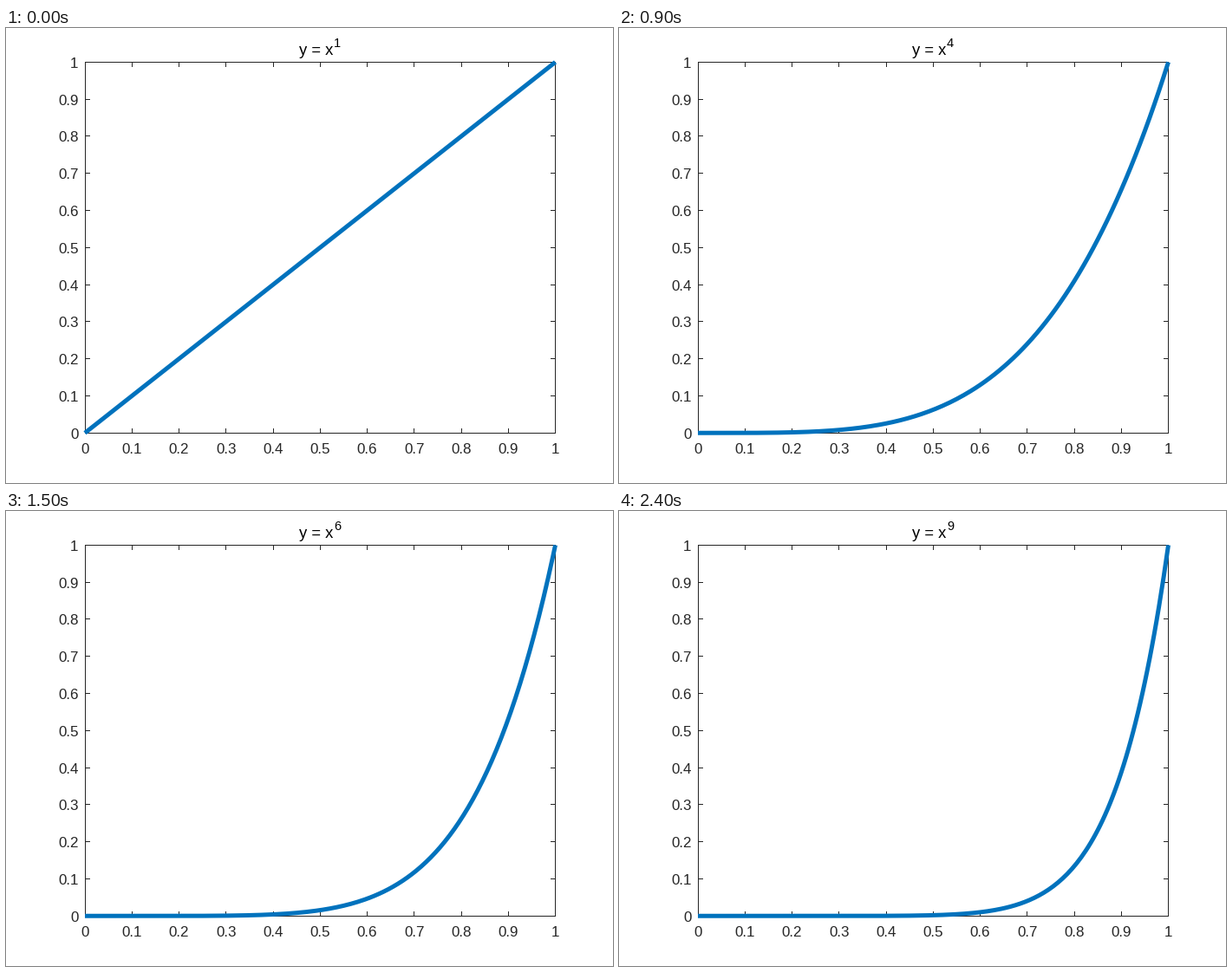
Recreate the animation shown at these times as a matplotlib script. Size 700 px wide and 525 px high, loop 2700 ms.

```python
import matplotlib.pyplot as plt
import numpy as np
from matplotlib.animation import FuncAnimation

WIDTH, HEIGHT, DPI = 700, 525, 100
PX = 72 / DPI  # points per pixel
LEFT, RIGHT = 0.13 * WIDTH, 0.905 * WIDTH
TOP, BOTTOM = 0.075 * HEIGHT, 0.89 * HEIGHT
TICK = 5
INK = "#262626"
BLUE = "#0072BD"
LABEL_SIZE = 17 * PX
TITLE_SIZE = 18.33 * PX

plt.rcParams["font.family"] = "Liberation Sans"

fig = plt.figure(figsize=(WIDTH / DPI, HEIGHT / DPI), dpi=DPI, facecolor="white")
stage = fig.add_axes([0, 0, 1, 1])
stage.set_xlim(0, WIDTH)
stage.set_ylim(HEIGHT, 0)
stage.axis("off")


def to_px(x, y):
    return LEFT + x * (RIGHT - LEFT), BOTTOM - y * (BOTTOM - TOP)


def pixel_center(value):
    return np.floor(value + 1e-6) + 0.5


def stroke(xs, ys):
    stage.plot(xs, ys, color=INK, lw=PX, snap=False,
               solid_capstyle="projecting", solid_joinstyle="miter")


def label(x, y, text, size=LABEL_SIZE, color=INK, ha="left"):
    return stage.text(x, y, text, fontsize=size, color=color, ha=ha, va="baseline")


def draw_axes():
    left, right, top, bottom = map(pixel_center, (LEFT, RIGHT, TOP, BOTTOM))
    stroke([left, right, right, left, left], [top, top, bottom, bottom, top])
    for value in np.arange(11) / 10:
        exact_x, exact_y = to_px(value, value)
        x, y = pixel_center(exact_x), pixel_center(exact_y)
        stroke([x, x], [bottom, bottom - TICK])
        stroke([x, x], [top, top + TICK])
        stroke([left, left + TICK], [y, y])
        stroke([right, right - TICK], [y, y])
        text = f"{value:g}"
        label(exact_x, 491, text, ha="center")
        label(83.5, y + 6.5, text, ha="right")


draw_axes()
label(338, 31, "y = x", TITLE_SIZE, "black")
exponent = label(378, 22, "1", TITLE_SIZE * 0.8, "black")

xs = np.linspace(0, 1, 201)
curve, = stage.plot([], [], color=BLUE, lw=5 * PX, snap=False, zorder=5,
                    solid_capstyle="butt", solid_joinstyle="round")


def update(frame):
    power = frame + 1
    curve.set_data(*to_px(xs, xs ** power))
    exponent.set_text(str(power))
    return curve, exponent


anim = FuncAnimation(fig, update, frames=9, interval=300, repeat=True, repeat_delay=0)
plt.show()
```
